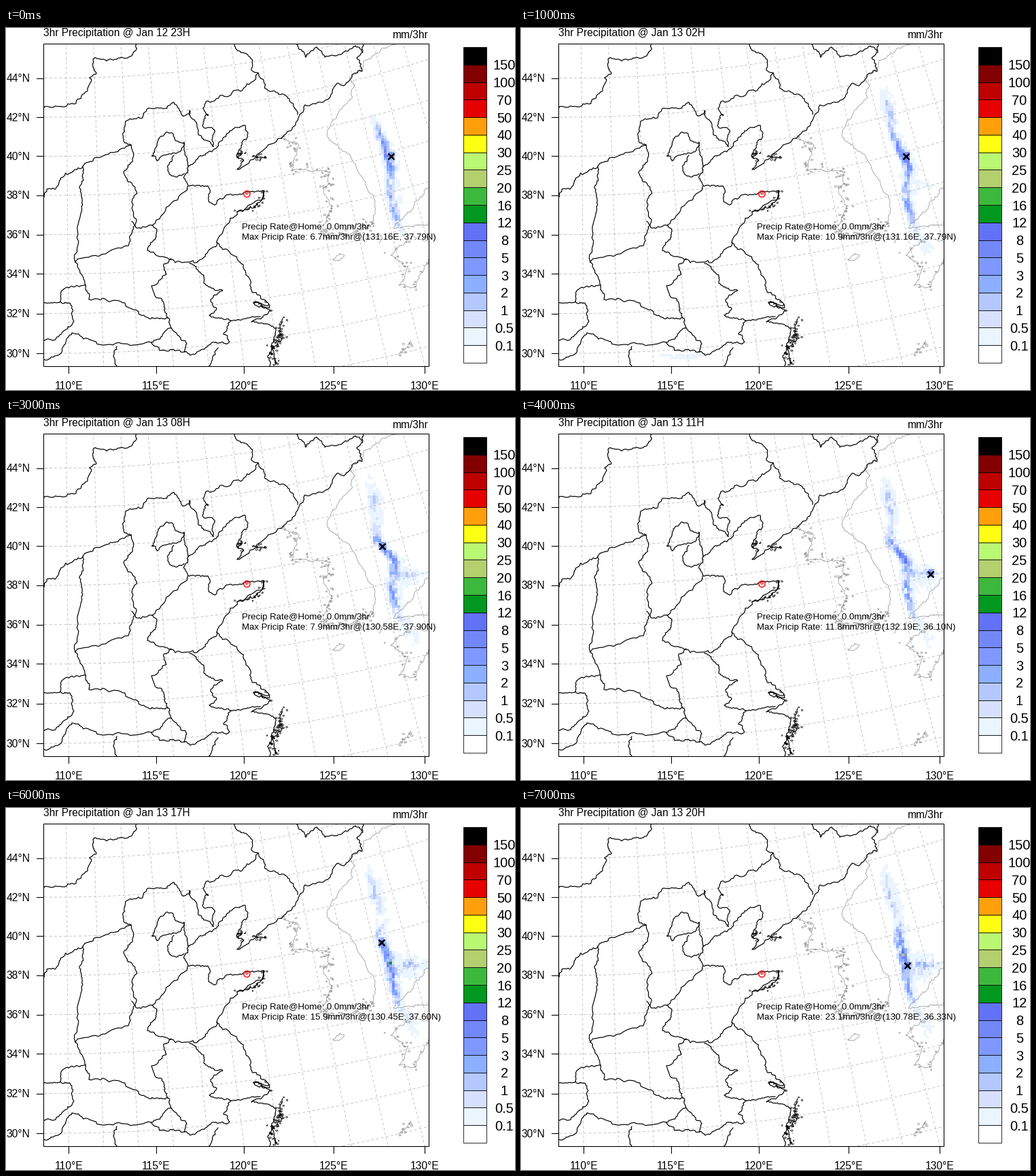
Recreate the animation shown at these times as a matplotlib script. Size 749 px wide and 532 px high, loop 8000 ms.

```python
import numpy as np
import matplotlib.pyplot as plt
from matplotlib.animation import FuncAnimation
from matplotlib.patches import Circle, Polygon, Rectangle

W, H = 749, 532
LEFT, TOP, RIGHT, BOTTOM = 55, 23, 622, 497
CELL = 4
LEVELS = [0.1, 0.5, 1, 2, 3, 5, 8, 12, 16, 20, 25, 30, 40, 50, 70, 100, 150]
COLORS = ["#ffffff", "#ebf5ff", "#d7e1ff", "#b4c8ff", "#8cb0ff", "#7e98ff",
          "#7388f8", "#6272f7", "#00981e", "#3cb93c", "#b4cf6e", "#b9f873",
          "#ffff14", "#ffa00a", "#e60000", "#be0000", "#820000", "#000000"]
PALETTE = np.array([[int(c[i:i + 2], 16) for i in (1, 3, 5)] for c in COLORS],
                   dtype=np.uint8)
GREY = "#8c8c8c"

# Cone constant, reference longitude and pole position of the projection.
CONE, LON0, POLE_X, POLE_Y = 0.681, 109.35, 75.6, -1662

plt.rcParams["font.family"] = "Liberation Sans"
fig = plt.figure(figsize=((W + 1e-6) / 72, (H + 1e-6) / 72), dpi=72,
                 facecolor="white")
ax = fig.add_axes([0, 0, 1, 1])
ax.axis("off")
ax.set_autoscale_on(False)
rng = np.random.default_rng(12)

frame = Rectangle((LEFT, TOP), RIGHT - LEFT, BOTTOM - TOP, fill=False,
                  ec="black", lw=1.1, zorder=5)
ax.add_patch(frame)


def project(lon, lat):
    """Lambert conformal projection to stage pixels."""
    rho = 3111 * np.tan(np.radians(45 - np.asarray(lat) / 2)) ** CONE
    theta = np.radians(CONE * (np.asarray(lon) - LON0))
    return POLE_X + rho * np.sin(theta), POLE_Y + rho * np.cos(theta)


def rough(pts, amount=0.15):
    """Break a polyline into small steps by midpoint displacement."""
    for _ in range(4):
        a, b = pts[:-1], pts[1:]
        d = b - a
        size = np.hypot(d[:, 0], d[:, 1])
        shift = np.clip(rng.normal(0, amount, len(d)), -0.3, 0.3)
        # Long steps bend less, so that key points keep the overall shape.
        shift *= np.minimum(1, 9 / size) * (size > 2.5)
        mid = (a + b) / 2 + np.c_[-d[:, 1], d[:, 0]] * shift[:, None]
        out = np.empty((len(pts) + len(mid), 2))
        out[::2], out[1::2] = pts, mid
        pts = out
    return pts


def trace(*xy, color="black", lw=1.2, islets=0, spread=4):
    """Draw a ragged line and scatter islets along it."""
    pts = rough(np.reshape(np.array(xy, float), (-1, 2)))
    line, = ax.plot(pts[:, 0], pts[:, 1], color=color, lw=lw, zorder=4)
    line.set_clip_path(frame)
    for center in pts[rng.integers(0, len(pts), islets)]:
        islet(center + rng.normal(0, spread, 2), color)


def coast(*xy, **kw):
    trace(*xy, color=GREY, lw=0.7, **kw)


def islet(center, color):
    turn = np.linspace(0, 2 * np.pi, 6)[:-1]
    r = rng.uniform(0.4, 1.8, 5)
    shape = Polygon(center + np.c_[1.3 * r * np.cos(turn), r * np.sin(turn)],
                    fill=False, ec=color, lw=0.7, zorder=4)
    ax.add_patch(shape)
    shape.set_clip_path(frame)


def label(x, y, s, size, ha="left"):
    return ax.text(x, y, s, fontsize=size, ha=ha, va="baseline", zorder=8)


def draw_grid():
    lon, lat = np.linspace(105, 140, 120), np.linspace(50, 24, 80)
    curves = [project(lon, v) for v in range(26, 50, 2)]
    curves += [project(v, lat) for v in range(108, 140, 2)]
    for x, y in curves:
        line, = ax.plot(x, y, color="#b8b8b8", lw=0.8, dashes=(5, 4), zorder=3)
        line.set_clip_path(frame)


def draw_axes():
    style = dict(color="black", lw=1.1, zorder=5)
    for lat in range(30, 46, 2):
        y = project(LON0, lat)[1]
        ax.plot([LEFT - 10, LEFT], [y, y], **style)
        label(35.5, y + 5.5, f"{lat}°N", 15.6, "right")
    for lon in range(110, 135, 5):
        x = POLE_X + (BOTTOM - POLE_Y) * np.tan(np.radians(CONE * (lon - LON0)))
        ax.plot([x, x], [BOTTOM, BOTTOM + 10], **style)
        label(x, 530.5, f"{lon}°E", 15.6, "center")
    label(RIGHT, 15, "mm/3hr", 15.5, "right")


def draw_colorbar():
    step = 464 / len(COLORS)
    for i, color in enumerate(COLORS):
        y = 492 - (i + 1) * step
        ax.add_patch(Rectangle((673, y), 34, step, fc=color, ec="black", lw=0.8))
        if i < len(LEVELS):
            label(733.5, y + 7.5, f"{LEVELS[i]:g}", 20, "center")


def draw_inland():
    # Northern frontier
    trace(55, 119, 103, 111, 123, 83, 123, 73, 133, 66, 128, 46, 160, 46,
          185, 41, 192, 23)
    trace(335, 23, 340, 33, 362, 46, 361, 62, 371, 66, 385, 91, 417, 104, 429, 127)
    trace(371, 66, 345, 93, 297, 107, 290, 118, 298, 128, 289, 143, 304, 147,
          305, 174)
    trace(405, 162, 429, 136, 440, 113, 470, 106, 488, 81, 497, 85, 520, 62,
          524, 64, 516, 44, 525, 36, 525, 23)
    trace(427, 23, 441, 43, 457, 28, 469, 43, 490, 39, 514, 26, 523, 34)
    # North China
    trace(55, 249, 60, 237, 72, 237, 88, 213, 113, 204, 130, 191, 184, 172)
    trace(113, 204, 108, 235, 111, 262, 102, 344)
    trace(184, 172, 187, 190, 173, 212, 192, 240, 187, 260, 191, 280, 180, 320,
          102, 344)
    trace(184, 172, 174, 168, 178, 136, 201, 132, 212, 118, 237, 118, 246, 109,
          263, 129, 270, 121, 281, 142, 283, 157, 305, 174)
    trace(215, 188, 224, 163, 244, 154, 250, 166, 262, 168, 254, 182, 232, 187,
          222, 195, 215, 188)
    trace(262, 168, 263, 186, 268, 203)
    trace(247, 187, 238, 210, 250, 219, 262, 214)
    # Central and eastern China
    trace(267, 233, 215, 290, 222, 299, 208, 327, 240, 340, 280, 345, 311, 316)
    trace(185, 284, 194, 294, 215, 290)
    trace(243, 339, 232, 347, 236, 362, 214, 379, 220, 395, 231, 402, 238, 426)
    trace(102, 344, 117, 378, 122, 399, 175, 404, 207, 425, 238, 426, 243, 441,
          214, 462)
    trace(55, 403, 80, 402, 82, 386, 117, 378)
    trace(80, 402, 97, 409, 98, 434, 73, 458, 55, 458)
    trace(55, 487, 78, 480, 97, 448, 144, 466, 214, 462, 226, 474, 262, 476)
    trace(163, 468, 158, 482, 163, 497)
    trace(270, 346, 291, 363, 293, 376, 319, 386, 301, 399, 310, 412, 299, 422,
          331, 430, 358, 426, 374, 424)
    trace(331, 430, 320, 450, 329, 461, 302, 463, 271, 481, 262, 476, 266, 464,
          243, 441)
    trace(312, 470, 299, 497)


def draw_seaboard():
    trace(405, 162, 350, 203, 340, 208, 350, 194, 339, 187, 356, 155, 352, 143,
          329, 151, 303, 182, 283, 190, 268, 203, 262, 221, 268, 232)
    trace(268, 232, 297, 232, 298, 255, 310, 258, 325, 245, 355, 241, 379, 239,
          378, 251, 340, 270, 310, 315)
    trace(310, 315, 336, 335, 360, 376, 362, 388, 382, 400, 388, 411, 364, 404,
          389, 415, 361, 432, 388, 436, 397, 445, 388, 478, 388, 497)
    # Island-studded stretches
    trace(341, 186, 348, 184, 342, 192, islets=8)
    trace(364, 188, 382, 190, islets=10, spread=3)
    trace(379, 240, 377, 252, 340, 270, islets=16, spread=2)
    trace(364, 403, 378, 406, 387, 406, islets=6, spread=3)
    trace(407, 427, 403, 447, 405, 460, 391, 470, 397, 494, islets=55)


def draw_neighbours():
    coast(405, 162, 431, 172, 421, 209, 473, 210, 477, 229, 467, 241, 479, 265,
          463, 297, 470, 307, islets=70, spread=5)
    coast(470, 307, 525, 297, 539, 288, islets=35, spread=5)
    coast(539, 288, 541, 250, 510, 195, 500, 182, 477, 166, 473, 150, 510, 102,
          512, 86, 505, 73, 522, 62)
    coast(522, 62, 527, 48, 551, 33, 574, 23)
    coast(622, 235, 605, 253, 596, 269, 570, 294, 622, 290)
    coast(622, 310, 600, 306, 566, 334, 592, 350, 578, 378, 601, 381, 622, 340,
          islets=22, spread=5)
    coast(481, 340, 491, 331, 498, 334, 490, 342, 481, 340)
    coast(547, 301, 554, 308, 549, 316)
    coast(596, 460, 588, 470, 578, 481, islets=10)


# Peak rate, its longitude and latitude, and the height of the rain core.
steps = [(6.7, 131.16, 37.79, 189), (10.9, 131.16, 37.79, 195),
         (6.4, 130.33, 38.57, 200), (7.9, 130.58, 37.90, 205),
         (11.8, 132.19, 36.10, 212), (13.2, 130.70, 37.10, 220),
         (15.9, 130.45, 37.60, 229), (23.1, 130.78, 36.33, 216)]

xs = np.arange(LEFT + CELL / 2, RIGHT, CELL)
ys = np.arange(TOP + CELL / 2, BOTTOM, CELL)
gx, gy = np.meshgrid(xs, ys)


def bump(v, center, width):
    return np.exp(-((v - center) / width) ** 2)


def spot(x, y, wide, tall):
    return bump(gx, x, wide) * bump(gy, y, tall)


def rain_image(i):
    """Rain band along a spine whose bulge travels south with time."""
    rate, lon, lat, core = steps[i]
    noise = np.random.default_rng(40 + i).normal(0, 1, (2,) + gx.shape)
    streaks = (noise[0] + np.roll(noise[0], 1, axis=0)) / 2 ** 0.5
    spine = np.interp(gy, (100, 150, 185, 210, 250, 285, 325),
                      (534, 545, 551, 565, 566, 574, 594))
    wave = np.cos(2 * np.pi * (i - (gy - 175) / 18) / 8)
    spine += 9 * wave * bump(gy, 190, 35)
    off = gx - spine

    north = min(i, 1) * bump(gy, 125, 24)
    south = bump(gy, 262, 26)
    rain = (4.5 * bump(gy, core - 5, 28) + 1.8 * south + 0.7 * north) * bump(off, 0, 5)
    veil = bump(gy, 215, 55) + north + min(i, 1) * 0.7 * bump(gy, 312, 22)
    rain += 0.3 * veil * bump(off, 4, 10)
    # Later hours spread an arm of rain out to the east.
    arm = i / 7
    rain += arm * (1.2 * spot(594, 231, 18, 4) + 0.45 * spot(590, 234, 18, 16))
    rain *= np.exp(0.7 * np.minimum(streaks, 1))

    x, y = project(lon, lat)
    rain = np.maximum(rain, min(rate, 9) * spot(x, y, 4, 4))
    core_x = spine[np.argmin(abs(ys - core)), 0]
    rain = np.maximum(rain, rate * spot(core_x, core, 3, 3))
    drizzle = 0.4 * bump(i, 1.5, 0.7) * spot(235 + 50 * (i - 1), 482, 32, 4)
    rain += drizzle * np.exp(0.4 * noise[1])
    return PALETTE[np.digitize(rain, LEVELS)]


images = [rain_image(i) for i in range(len(steps))]
rain = ax.imshow(images[0], interpolation="nearest", aspect="auto", zorder=1,
                 extent=(LEFT, LEFT + CELL * len(xs), TOP + CELL * len(ys), TOP))
rain.set_clip_path(frame)
ax.set_xlim(0, W)
ax.set_ylim(H, 0)

draw_grid()
draw_neighbours()
draw_inland()
draw_seaboard()
draw_axes()
draw_colorbar()

ax.add_patch(Circle((354.5, 244), 4.6, fill=False, ec="red", lw=1.4, zorder=6))
ax.plot([352.5, 354.5, 356.5], [242.5, 244.5, 242.5], color="red", lw=1.2, zorder=6)
label(347, 295.5, "Precip Rate@Home: 0.0mm/3hr", 13.2)
title = label(54.5, 12, "", 15.5)
peak_text = label(347, 310.5, "", 13.2)
cross, = ax.plot([], [], "x", color="black", ms=9, mew=2.5, zorder=7)


def update(i):
    rate, lon, lat, _ = steps[i]
    day, hour = divmod(23 + 3 * i, 24)
    rain.set_data(images[i])
    title.set_text(f"3hr Precipitation @ Jan {12 + day} {hour:02d}H")
    peak_text.set_text(f"Max Pricip Rate: {rate}mm/3hr@({lon:.2f}E, {lat:.2f}N)")
    x, y = project(lon, lat)
    cross.set_data([x], [y])
    return rain, title, peak_text, cross


anim = FuncAnimation(fig, update, frames=len(steps), interval=1000,
                     init_func=lambda: update(0), repeat=True, repeat_delay=0)
plt.show()
```
